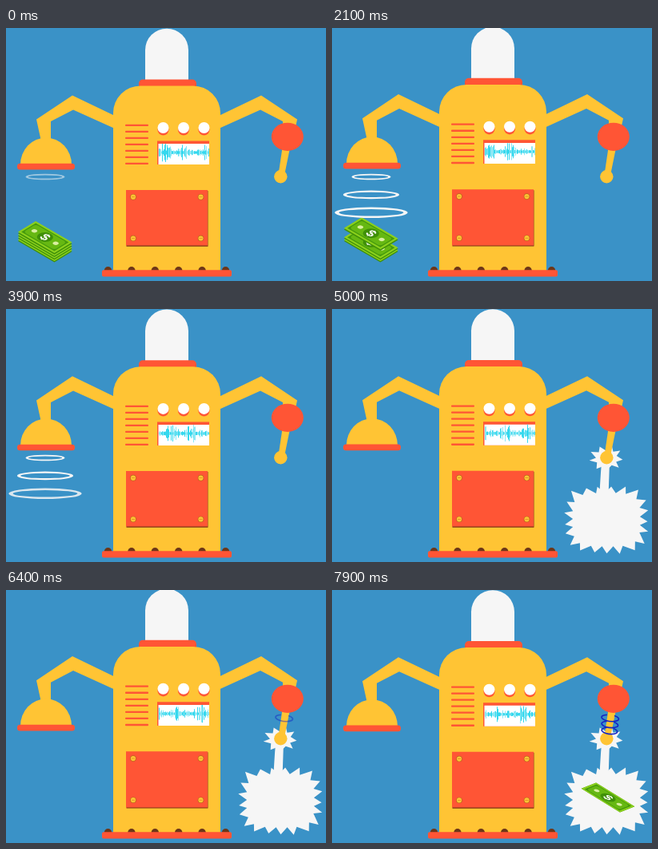
Write an HTML page with a canvas that moves like this. It is 400x317 px and loops after 8 s.

```html
<!DOCTYPE html>
<html lang="en">
<head>
<meta charset="utf-8">
<title>Money machine</title>
<style>
html, body { margin: 0; width: 100%; height: 100%; overflow: hidden; background: #3a92c7; }
canvas { display: block; width: 400px; height: 317px; }
</style>
</head>
<body>
<canvas id="stage"></canvas>
<script>
const W = 400, H = 317, LOOP = 8000, TAU = Math.PI * 2;
const BLUE = '#3a92c7', YELLOW = '#ffc434', RED = '#ff5535', WHITE = '#f6f6f6';
const canvas = document.getElementById('stage');
const ctx = canvas.getContext('2d');
const dpr = window.devicePixelRatio || 1;
canvas.width = Math.round(W * dpr);
canvas.height = Math.round(H * dpr);

const ramp = (t, start, length) => Math.min(1, Math.max(0, (t - start) / length));
const hash = n => {
  const s = Math.sin(n * 127.1 + 11.7) * 43758.5453;
  return s - Math.floor(s);
};
function repeat(count, draw) {
  for (let i = 0; i < count; i++) draw(i);
}

function fillPath(color, build, rule = 'nonzero') {
  ctx.fillStyle = color;
  ctx.beginPath();
  build();
  ctx.fill(rule);
}
const poly = (color, points) => fillPath(color, () => {
  points.forEach(([x, y]) => ctx.lineTo(x, y));
  ctx.closePath();
});
const oval = (color, x, y, rx, ry = rx) =>
  fillPath(color, () => ctx.ellipse(x, y, rx, ry, 0, 0, TAU));
const box = (color, x, y, w, h, r = 0) =>
  fillPath(color, () => ctx.roundRect(x, y, w, h, r));

function scoped(draw, alpha = 1) {
  if (alpha <= 0) return;
  ctx.save();
  ctx.globalAlpha = alpha;
  draw();
  ctx.restore();
}

// Spikes on a superellipse; a higher power gives a squarer outline.
function star(cx, cy, rx, ry, spikes, valley, power) {
  const points = [];
  repeat(spikes * 2, i => {
    const a = (i + 0.5 * hash(i)) / (spikes * 2) * TAU;
    const c = Math.cos(a), s = Math.sin(a);
    const reach = (Math.abs(c) ** power + Math.abs(s) ** power) ** (-1 / power);
    const r = reach * (i % 2 ? valley : 0.95 + 0.08 * hash(i + 40));
    points.push([cx + rx * r * c, cy + ry * r * s]);
  });
  poly(WHITE, points);
}

// Bill in perspective: ux, uy point along its length, vx, vy across it.
function bill(x, y, [ux, uy, vx, vy], thickness) {
  scoped(() => {
    ctx.transform(ux, uy, vx, vy, x, y + thickness);
    box('#3f8f08', -26.5, -13.5, 53, 27);
  });
  scoped(() => {
    ctx.transform(ux, uy, vx, vy, x, y);
    box('#8bd01c', -26.5, -13.5, 53, 27);
    box('#459a0c', -24, -11, 48, 22);
    box('#66b812', -22.5, -9.5, 45, 19, 4);
    oval('#3f8f08', 0, 0, 8.5);
    for (const side of [-1, 1]) oval('#d9efa0', side * 15.5, 0, 3);
    ctx.fillStyle = '#fff';
    ctx.font = 'bold 16px "Liberation Sans", Arial, sans-serif';
    ctx.textAlign = 'center';
    ctx.textBaseline = 'middle';
    ctx.fillText('$', 0, 0.8);
  });
}

function stack(t) {
  repeat(4, i => {
    const p = ramp(t, 3200 - i * 600, 600);
    scoped(() => bill(48.8, 272 - i * 3.3 - 48 * p, [0.86, 0.5, -0.82, 0.5], 1.6), 1 - p ** 0.7);
  });
}

function rings(t) {
  repeat(3, i => {
    const y = 186.5 + 22.4 * i, rx = 24.5 + 10.6 * i, ry = 3.8 + 1.5 * i, w = 1.7 + 0.45 * i;
    const alpha = ramp(t, i * 600 - 200, 370) * (1 - ramp(t, 4450 - i * 300, 350));
    scoped(() => fillPath(WHITE, () => {
      ctx.ellipse(49, y, rx, ry, 0, 0, TAU);
      ctx.ellipse(49, y, rx - w * 2, ry - w, 0, 0, TAU);
    }, 'evenodd'), alpha);
  });
}

function burst(t) {
  scoped(() => {
    star(343, 264, 53, 42, 21, 0.79, 4);
    poly(WHITE, [[337, 190], [347, 190], [345.5, 236], [334, 236]]);
    star(343, 187, 21, 15.5, 9, 0.62, 2.5);
  }, ramp(t, 4600, 350));
  scoped(() => bill(345, 260, [0.91, 0.56, -0.68, 0.27], 0), ramp(t, 7300, 450));
}

function wave(t) {
  const shift = Math.floor(t / 100) * 4;
  scoped(() => {
    ctx.beginPath();
    ctx.rect(191, 145, 63, 26);
    ctx.clip();
    box('#6fe0f2', 191, 155.2, 63, 1.6);
    repeat(63, x => {
      const n = x + shift;
      const swell = 0.6 + 0.4 * Math.sin(n * 0.23);
      const h = 1.5 + 11 * swell * hash(n) ** 2;
      box(hash(n + 500) > 0.5 ? '#35d8ee' : '#8ce8f5', 191 + x, 156 - h, 1, h * 2);
    });
  });
}

function arms() {
  const arm = [[136, 110], [83, 84.5], [38, 114.5], [44, 142], [56, 142], [56, 117], [84, 102.5], [136, 126]];
  poly(YELLOW, arm);
  poly(YELLOW, arm.map(([x, y]) => [402 - x, y]));
}

function panel() {
  box('#7d3516', 150.5, 204, 102, 69.8);
  box(RED, 150, 203, 102, 69.6);
  repeat(4, i => {
    const x = 159 + 84.5 * (i % 2), y = 211.7 + 51.8 * (i >> 1);
    oval('#b8641c', x, y, 3.8);
    oval(YELLOW, x, y, 3.1);
    box('#d98c25', x - 2, y - 0.4, 4, 0.8);
  });
}

function robot(t) {
  // The machine breathes: a slight stretch upward from its base.
  const stretch = 1 + 0.0035 * (1 - Math.cos(t / 4300 * TAU));
  scoped(() => {
    ctx.translate(0, 304);
    ctx.scale(1, stretch);
    ctx.translate(0, -304);

    arms();
    fillPath(YELLOW, () => ctx.ellipse(50, 171, 32, 33.5, 0, Math.PI, 0));
    box(RED, 14, 169.8, 72, 7.6, 3.5);

    box(WHITE, 174, 0.7, 54, 66, [27, 27, 0, 0]);
    box(RED, 166, 64.5, 72, 12, [5, 5, 0, 0]);
    box(YELLOW, 134, 72.5, 134, 232, [34, 34, 0, 0]);

    repeat(7, i => box(RED, 149, 120.8 + i * 8, 29, 2.3, 1));
    repeat(3, i => {
      oval(RED, 196.5 + i * 25.5, 127.6, 7);
      oval('#fff', 196.5 + i * 25.5, 125, 7);
    });
    box(RED, 189, 141.5, 65, 29.5);
    box('#fff', 190.5, 145, 63.5, 26);
    wave(t);
    panel();
  });
  repeat(6, i => oval('#6d3618', 127.5 + i * 29.4, 303.8, 4.7));
  box(RED, 120, 303.3, 162, 8.2, 2);
}

function rightHand() {
  poly(YELLOW, [[345.5, 150], [355, 150], [347.5, 187], [340, 187]]);
  oval(YELLOW, 343.3, 186.3, 8.2);
  oval(RED, 351.8, 136.3, 20, 17.6);
}

function coil(t) {
  ctx.strokeStyle = '#1425c4';
  ctx.lineWidth = 1.6;
  repeat(3, i => scoped(() => {
    ctx.beginPath();
    ctx.ellipse(347.7 - i * 0.4, 160.5 + i * 8, 10.8 - i * 0.5, 4, 0.12, -1.1, 4.3);
    ctx.stroke();
  }, ramp(t, 6200 + i * 400, 400)));
}

function draw(t) {
  ctx.setTransform(dpr, 0, 0, dpr, 0, 0);
  box(BLUE, 0, 0, W, H);
  stack(t);
  rings(t);
  robot(t);
  burst(t);
  rightHand();
  coil(t);
}

const begin = performance.now();
function tick() {
  draw((performance.now() - begin) % LOOP);
  requestAnimationFrame(tick);
}
tick();
</script>
</body>
</html>
```
